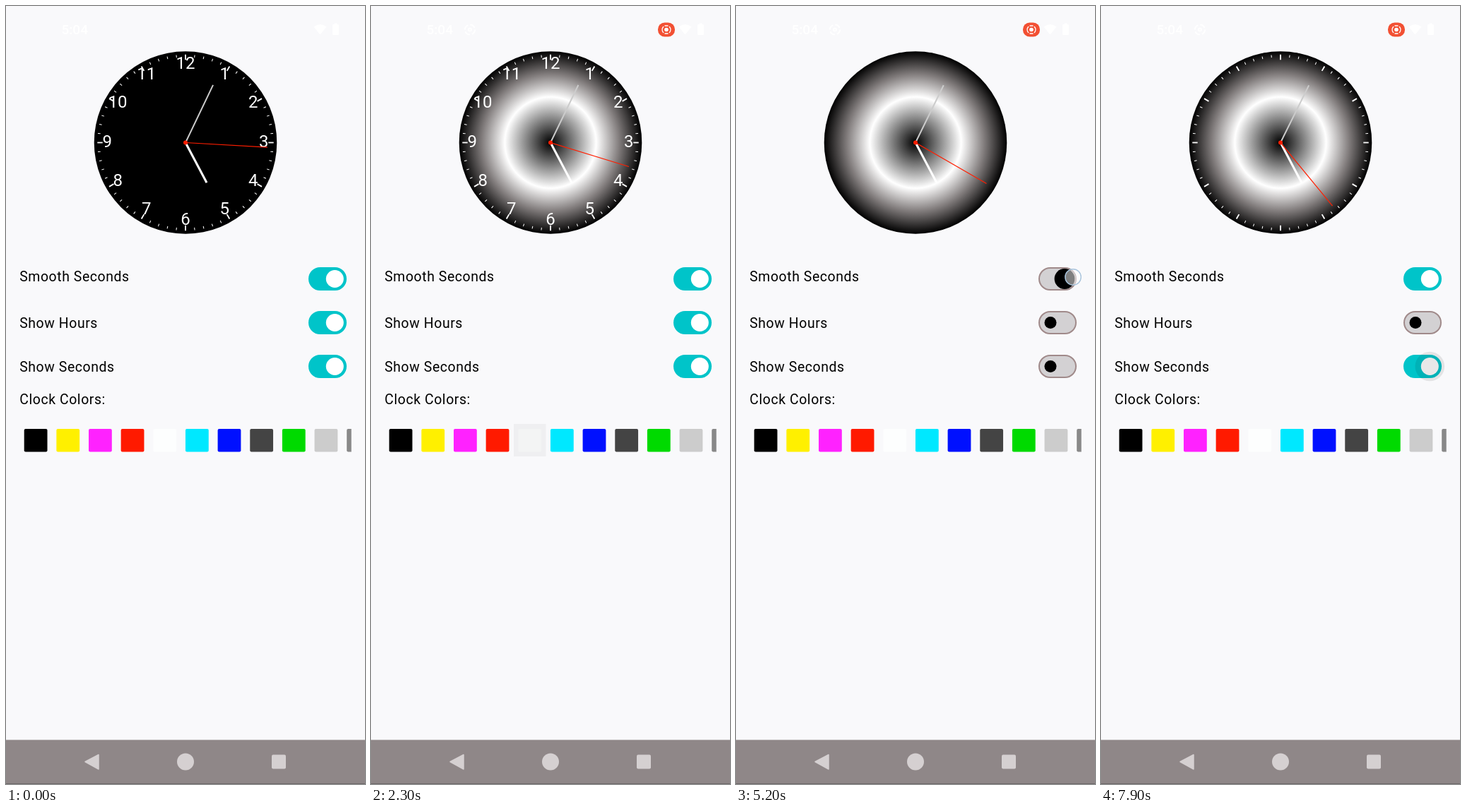
An HTML page that plays this animation: 508 px wide and 1102 px high, repeating every 8000 ms.

```html
<!DOCTYPE html>
<html lang="en">
<head>
<meta charset="utf-8">
<title>Clock settings</title>
<style>
  html, body { margin: 0; width: 100%; height: 100%; overflow: hidden; background: #f9f9fb; }
  svg { display: block; width: 508px; height: 1102px; font-family: Roboto, sans-serif; }
  .label { font-size: 19.4px; letter-spacing: .6px; }
  .numerals { font-size: 24px; fill: #fff; text-anchor: middle; }
  .ticks { stroke: #fff; }
  .status { fill: #fff; font-size: 19px; font-weight: 500; }
  .nav { fill: #d5d0d1; }
</style>
</head>
<body>
<svg viewBox="0 0 508 1102">
  <defs>
    <radialGradient id="rings">
      <stop offset="0" stop-color="#000"/>
      <stop offset=".5" stop-color="#fff"/>
      <stop offset=".75" stop-color="#827d7d"/>
      <stop offset="1" stop-color="#000"/>
    </radialGradient>
    <clipPath id="row"><rect x="20" y="585" width="468.7" height="60"/></clipPath>
  </defs>
  <rect width="508" height="1102" fill="#f9f9fb"/>

  <g class="status">
    <text x="78.500" y="40">5:04</text>
    <path d="M435.500 29.500Q444.500 22.500 453.500 29.500L444.500 40.500Z"/>
    <rect x="462" y="26" width="9" height="15" rx="1.500"/>
    <rect x="464.500" y="24.500" width="4" height="2"/>
  </g>
  <g id="recording">
    <g fill="none" stroke="#fff" stroke-width="2">
      <circle cx="140" cy="33.500" r="7" stroke-dasharray="8 3"/>
      <circle cx="140" cy="33.500" r="2"/>
    </g>
    <g id="chip">
      <rect x="-12" y="-10" width="24" height="20" rx="9.500" fill="#f25033"/>
      <circle r="2.800" fill="#fff"/>
      <g fill="none" stroke="#fff" stroke-width="1.400">
        <path d="M-2.500-5.500H2.500M-2.500 5.500H2.500"/>
        <path d="M-4-4.500Q-8 0-4 4.500M4-4.500Q8 0 4 4.500"/>
      </g>
    </g>
  </g>

  <circle id="face" cx="254" cy="193.500" r="129.300"/>
  <g id="ticks" class="ticks"></g>
  <g id="numerals" class="numerals"></g>
  <g transform="translate(254 193.500)">
    <line id="hour" y2="-64.200" stroke="#fff" stroke-width="3"/>
    <line id="minute" y2="-90.500" stroke="#ccc" stroke-width="2"/>
    <line id="second" y2="-116" stroke="#ff1e00" stroke-width="1.200"/>
    <circle r="3" fill="#ff1e00"/>
  </g>

  <g class="label">
    <text x="19.200" y="390">Smooth Seconds</text>
    <text x="19.200" y="455.500">Show Hours</text>
    <text x="19.200" y="517.500">Show Seconds</text>
    <text x="19.200" y="564">Clock Colors:</text>
  </g>
  <g id="switches"></g>
  <g id="swatches" clip-path="url(#row)"></g>
  <rect id="press" x="202" y="592" width="45.500" height="46"/>
  <circle id="pointer" r="11.200" fill="#fff" fill-opacity=".5" stroke="#a9c4dc" stroke-width="1.400"/>

  <rect y="1039.500" width="508" height="62.500" fill="#8f8788"/>
  <rect y="1101" width="508" height="1" fill="#6c6667"/>
  <g class="nav">
    <path d="M112 1070.500L131 1060.500V1081Z" stroke="#d5d0d1" stroke-width="1.500" stroke-linejoin="round"/>
    <circle cx="254" cy="1070.500" r="12"/>
    <rect x="376" y="1060.500" width="20" height="20" rx="2"/>
  </g>
</svg>

<script>
const LOOP = 8000, STEP = 100, START_SECOND = 15.54, TAP = 200;
const $ = id => document.getElementById(id);

function set(node, attrs) {
  for (const key in attrs) node.setAttribute(key, attrs[key]);
  return node;
}
function add(parent, tag, attrs) {
  const node = document.createElementNS('http://www.w3.org/2000/svg', tag);
  return parent.appendChild(set(node, attrs));
}
const clamp = v => Math.max(0, Math.min(1, v));
const mix = (a, b, p) => a + (b - a) * p;
const show = (node, on) => set(node, { visibility: on ? 'visible' : 'hidden' });
const turn = (id, deg) => set($(id), { transform: `rotate(${deg})` });

// Clock face
for (let i = 0; i < 60; i++) {
  const major = i % 5 === 0;
  add($('ticks'), 'line', {
    y1: -124.7, y2: major ? -117.3 : -121,
    'stroke-width': major ? 1.8 : 1,
    transform: `translate(254 193.5) rotate(${i * 6})`
  });
}
for (let n = 1; n <= 12; n++) {
  const a = n * Math.PI / 6;
  add($('numerals'), 'text', {
    x: 254 + 110.7 * Math.sin(a), y: 199.6 - 110.7 * Math.cos(a)
  }).textContent = n;
}

// Color swatches
const colors = ['#000', '#fff000', '#ff22ff', '#ff1a00', '#fdfefe', '#00e8ff',
  '#0010ff', '#444', '#00da00', '#ccc', '#888'];
colors.forEach((fill, i) => add($('swatches'), 'rect', {
  x: 25.7 + 45.65 * i, y: 599, width: 32.8, height: 32.5, rx: 2, fill
}));

// Each tap has a release time and a pointer position
const swatchTap = { up: 1700, x: 227, y: 626 };
const switches = [
  { y: 386.5, taps: [{ up: 5200, x: 477, y: 384 }, { up: 6700, x: 475, y: 386 }] },
  { y: 448.5, taps: [{ up: 4300, x: 479, y: 449 }] },
  { y: 510.5, taps: [{ up: 3400, x: 471, y: 511 }, { up: 7700, x: 474, y: 511 }] }
];
const taps = [swatchTap, ...switches.flatMap(s => s.taps)];

for (const s of switches) {
  const g = $('switches');
  s.track = add(g, 'rect', { x: 429, y: s.y - 15.5, width: 52, height: 31, rx: 15.5, 'stroke-width': 2 });
  s.thumb = add(g, 'circle', { cy: s.y });
  s.ripple = add(g, 'circle', { cy: s.y, r: 20.8 });
}

const isOn = (s, t) => s.taps.filter(tap => tap.up <= t).length % 2 === 0;
const touching = (tap, t) => t >= tap.up - TAP && t <= tap.up;

function rippleAlpha(tap, t, hold) {
  const d = t - tap.up;
  return clamp(d / 100) * clamp(1 - (d - hold) / 200);
}

function drawSwitch(s, t) {
  const on = isOn(s, t);
  const last = s.taps.filter(tap => tap.up <= t).pop();
  const p = last ? clamp((t - last.up) / 150) : 1;
  const pressed = s.taps.some(tap => touching(tap, t));
  const x = on ? mix(445, 465.3, p) : mix(465, 445, p);
  const r = pressed ? 14.4 : mix(14.4, on ? 12.5 : 8.5, p);
  set(s.track, { fill: on ? '#00c4c9' : '#d3d1d3', stroke: on ? '#00c4c9' : '#a08a8a' });
  set(s.thumb, { cx: x, r, fill: on ? '#fff' : '#000' });
  set(s.ripple, { cx: x, 'fill-opacity': last ? .09 * rippleAlpha(last, t, 250) : 0 });
}

function draw(t) {
  const [smooth, hours, seconds] = switches.map(s => isOn(s, t));
  const now = START_SECOND + t / 1000;
  turn('second', 6 * (smooth ? now : Math.floor(now)));
  turn('minute', 24 + now / 10);
  turn('hour', 152 + now / 120);
  show($('numerals'), hours);
  show($('ticks'), seconds);
  set($('face'), { fill: t > swatchTap.up ? 'url(#rings)' : '#000' });
  set($('press'), { 'fill-opacity': .04 * rippleAlpha(swatchTap, t, 650) });
  switches.forEach(s => drawSwitch(s, t));

  const tap = taps.find(item => touching(item, t));
  show($('pointer'), tap);
  if (tap) set($('pointer'), { cx: tap.x, cy: tap.y });

  const chip = clamp((t - 300) / 300);
  show($('recording'), chip > 0);
  set($('chip'), { transform: `translate(418 33.5) scale(${chip})` });
}

function frame() {
  const t = performance.now() % LOOP;
  draw(Math.floor(t / STEP) * STEP);
  requestAnimationFrame(frame);
}
frame();
</script>
</body>
</html>
```
